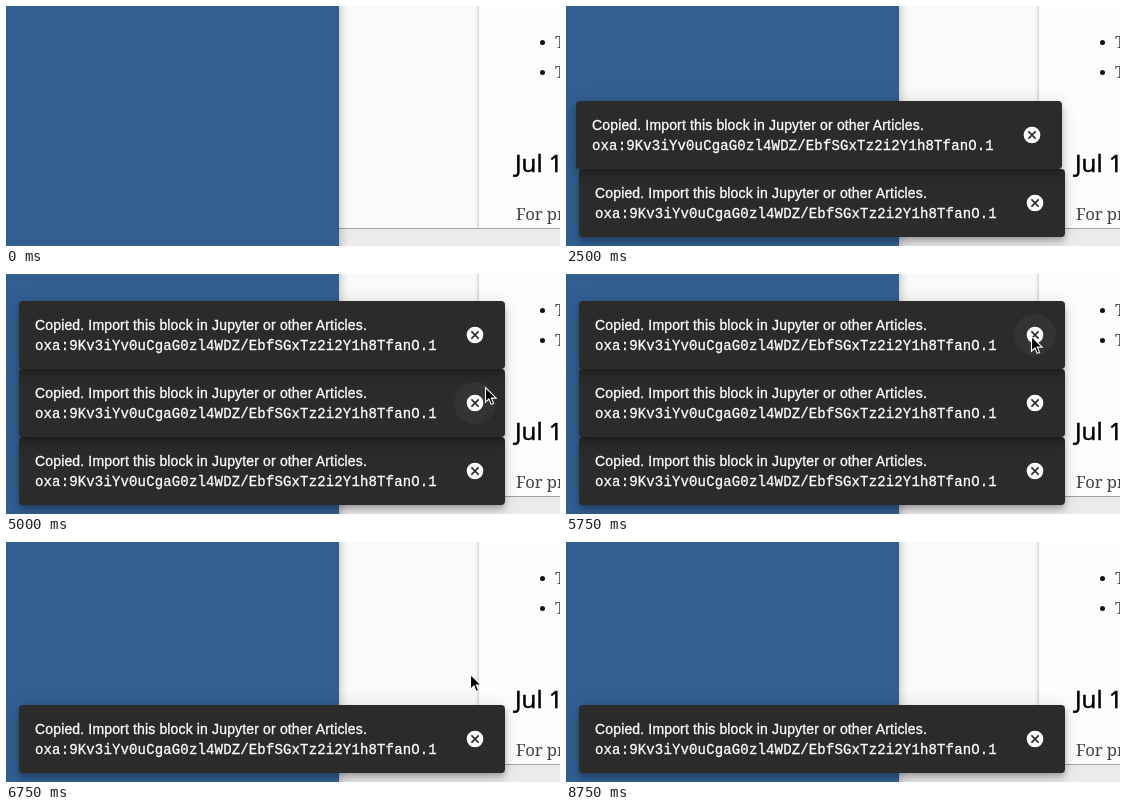
An HTML page that plays this animation: 554 px wide and 240 px high, repeating every 9750 ms.

```html
<!DOCTYPE html>
<html lang="en">
<head>
<meta charset="utf-8">
<title>Stacked notifications</title>
<style>
  html, body { margin: 0; width: 100%; height: 100%; overflow: hidden; }
  #stage { position: relative; width: 554px; height: 240px; overflow: hidden; background: #f9fafa; }
  #stage > * { position: absolute; white-space: nowrap; }
  .paper { left: 473px; top: -20px; width: 120px; height: 300px; background: #fcfdfd; box-shadow: 0 0 4px rgba(0, 0, 0, .32); }
  .bar { left: 333px; top: 222px; width: 221px; height: 17px; background: #ebebeb; border-top: 1px solid #a2a2a2; }
  .panel { left: -20px; top: -20px; width: 353px; height: 280px; background: #325e90; box-shadow: 0 0 10px rgba(0, 0, 0, .3); }
  .serif { font: 16.6px/22px "Noto Serif", serif; color: #444; }
  .dot { left: 534px; width: 5px; height: 5px; border-radius: 50%; background: #111; }
  .title {
    left: 509px; top: 141px; font: 500 24px/32px "Noto Sans", "Open Sans", sans-serif; color: #000;
    -webkit-text-stroke: .4px #000;
  }
  .card {
    left: 13px; width: 486px; height: 68px; border-radius: 4px;
    background: #2b2b2b; color: #fff;
    font: 14px/20px Arial, "Liberation Sans", sans-serif; letter-spacing: .15px;
    -webkit-text-stroke: .3px #fff;
    box-shadow: 0 3px 5px -1px rgba(0, 0, 0, .2), 0 6px 10px rgba(0, 0, 0, .14), 0 1px 18px rgba(0, 0, 0, .12);
  }
  .card > * { position: absolute; left: 16px; }
  .card p { margin: 0; top: 14px; }
  .card code { top: 35px; font: 14px/20px "Courier New", "Liberation Mono", monospace; }
  .card svg { left: 446px; top: 24px; }
  .card i { left: 435px; top: 13px; width: 42px; height: 42px; border-radius: 50%; background: rgba(255, 255, 255, .04); }
  #cursor { left: 0; top: 0; overflow: visible; }
</style>
</head>
<body>
<div id="stage">
  <div class="paper"></div>
  <div class="dot" style="top:34px"></div>
  <div class="dot" style="top:64px"></div>
  <div class="serif" style="left:549px;top:25px">The</div>
  <div class="serif" style="left:549px;top:55px">The</div>
  <div class="title">Jul 1</div>
  <div class="serif" style="left:510px;top:197px">For pr</div>
  <div class="bar"></div>
  <div class="panel"></div>
  <svg id="cursor" width="12" height="19" viewBox="0 0 12 19">
    <path d="M.5 .5V15.2L3.9 12l2.3 5.4 2.4-1L6.3 11.1h4.9z" fill="#000" stroke="#fff" stroke-width="1.1"/>
  </svg>
</div>
<script>
const LOOP = 9750;
const STEP = 250;     // the picture advances four times a second
const TRAVEL = 499;   // distance from off-stage to rest
const ENTER = 225;
const LEAVE = 195;

const stage = document.getElementById('stage');
const cursor = document.getElementById('cursor');

function makeCard(row, open, close) {
  const el = document.createElement('div');
  const top = 163 - 68 * row;
  el.className = 'card';
  el.style.top = top + 'px';
  el.innerHTML = `
    <p>Copied. Import this block in Jupyter or other Articles.</p>
    <code>oxa:9Kv3iYv0uCgaG0zl4WDZ/EbfSGxTz2i2Y1h8TfanO.1</code>
    <i></i>
    <svg width="20" height="20" viewBox="0 0 24 24">
      <circle cx="12" cy="12" r="10" fill="#fff"/>
      <path d="M7.7 7.7l8.6 8.6M16.3 7.7l-8.6 8.6" stroke="#2b2b2b" stroke-width="2"/>
    </svg>`;
  stage.insertBefore(el, cursor);
  return { el, open, close, buttonY: top + 34, glow: el.querySelector('i') };
}

const cards = [
  makeCard(0, 1137, 7300),
  makeCard(1, 2316, 6205),
  makeCard(2, 2975, 5847),
  makeCard(0, 8457, Infinity)
];

// Pointer key points: time, x, y.
const path = [
  [5000, 479, 113], [5250, 464, 88], [5750, 465, 62], [6250, 464, 132],
  [6750, 464, 132], [7250, 463, 200], [7750, 463, 195], [8000, 469, 169]
];

const clamp = p => Math.min(1, Math.max(0, p));

// Decelerates in, accelerates out; both cubic.
function slide({ open, close }, t) {
  const left = 1 - clamp((t - open) / ENTER);
  const gone = clamp((t - close) / LEAVE);
  return -Math.round(TRAVEL * Math.max(left ** 3, gone ** 3));
}

function pointerAt(t) {
  const next = path.findIndex(point => point[0] >= t);
  if (next < 0 || t < path[0][0]) return null;
  const [t1, x1, y1] = path[next];
  const [t0, x0, y0] = path[Math.max(0, next - 1)];
  const p = t1 > t0 ? (t - t0) / (t1 - t0) : 1;
  return [x0 + (x1 - x0) * p, y0 + (y1 - y0) * p].map(Math.round);
}

function place(el, x, y) {
  el.style.transform = `translate(${x}px, ${y}px)`;
}

function draw(time) {
  const t = time - time % STEP;
  const tip = pointerAt(t);
  cursor.style.display = tip ? '' : 'none';
  if (tip) place(cursor, ...tip);

  for (const card of cards) {
    const x = slide(card, t);
    card.el.style.display = x > -TRAVEL ? '' : 'none';
    place(card.el, x, 0);
    const hovered = tip && Math.hypot(tip[0] - 469 - x, tip[1] - card.buttonY) < 21;
    card.glow.hidden = !hovered;
  }
}

const began = performance.now();
function tick() {
  draw((performance.now() - began) % LOOP);
  requestAnimationFrame(tick);
}
tick();
</script>
</body>
</html>
```
